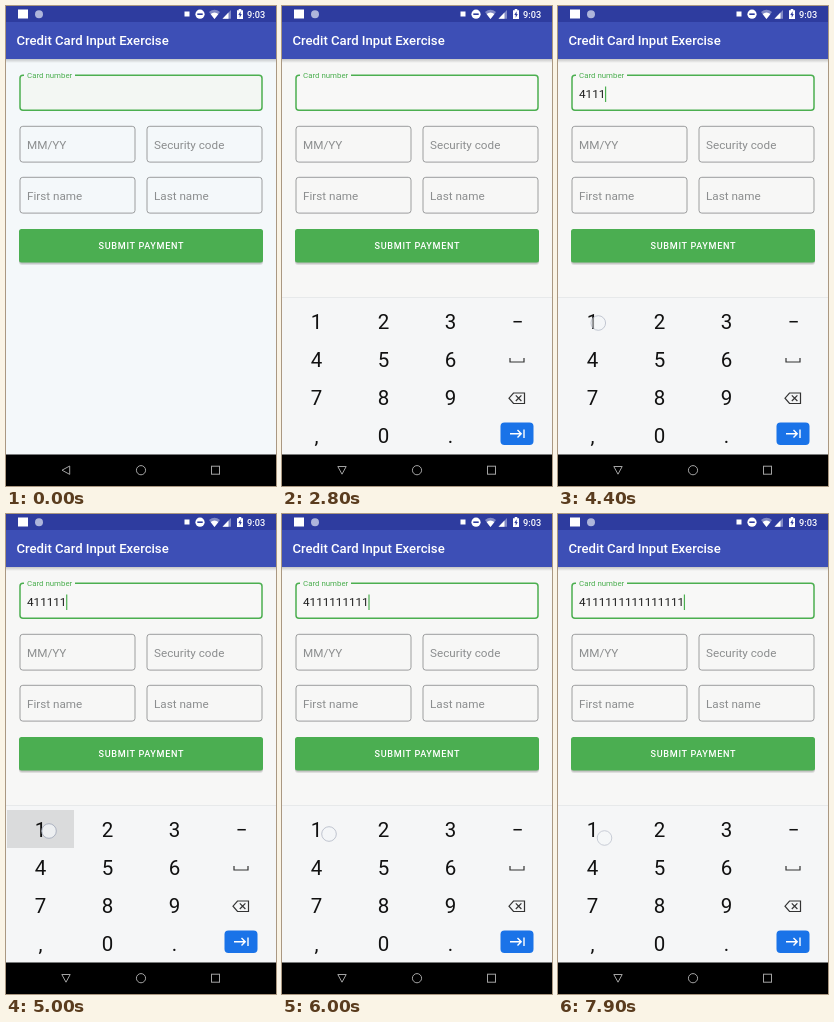
An HTML page that plays this animation: 270 px wide and 480 px high, repeating every 8000 ms.

```html
<!DOCTYPE html>
<html lang="en">
<head>
<meta charset="utf-8">
<title>Card input</title>
<style>
  html, body { margin: 0; width: 100%; height: 100%; overflow: hidden; }
  svg { display: block; width: 100%; height: 100%; }
  text { font: 11.7px Roboto, Arial, sans-serif; }
  .bold { font-weight: 500; fill: #fff; }
  .hint { fill: #8c8e8f; }
  .box { fill: none; stroke: #929495; stroke-width: .9; }
  .key { font-size: 20.5px; text-anchor: middle; fill: #111; }
  .nav { fill: none; stroke: #a3a3a3; stroke-width: 1; }
  .icon { fill: none; stroke: #333; stroke-width: 1.2; }
</style>
</head>
<body>
<svg viewBox="0 0 270 480">
  <defs>
    <linearGradient id="shade" x2="0" y2="1">
      <stop stop-color="#000" stop-opacity=".2"/>
      <stop offset="1" stop-color="#000" stop-opacity="0"/>
    </linearGradient>
  </defs>
  <rect id="page" width="270" height="480"/>

  <!-- app bar and status bar -->
  <rect y="53" width="270" height="4" fill="url(#shade)"/>
  <rect width="270" height="53" fill="#3d4fb6"/>
  <rect width="270" height="16" fill="#2e3c9f"/>
  <text class="bold" x="10.5" y="39.3" style="font-size:13.14px">Credit Card Input Exercise</text>
  <g fill="#fff">
    <rect x="12" y="3.5" width="10" height="9"/>
    <circle cx="33" cy="8.2" r="4" fill="#aeb5db"/>
    <rect x="178.5" y="5.5" width="5" height="5"/>
    <circle cx="194" cy="8.2" r="4.6"/>
    <rect x="191.3" y="7.4" width="5.4" height="1.6" fill="#2e3c9f"/>
    <path d="M203 6Q208.5 1.7 214 6L208.5 13Z" fill-opacity=".4"/>
    <path d="M204.6 8Q208.5 5 212.4 8L208.5 13Z"/>
    <path d="M216.5 12.7L225 4V12.7Z" fill-opacity=".4"/>
    <path d="M216.5 12.7L222.5 6.5V12.7Z"/>
    <path d="M231 4.2H232.7V3H235.3V4.2H237V13H231Z"/>
    <path d="M234.6 5.3L232.3 9H233.7V11.8L235.8 8H234.6Z" fill="#2e3c9f"/>
  </g>
  <text class="bold" x="241" y="11.6" style="font-size:9.2px">9:03</text>

  <!-- form -->
  <rect id="field" x="14" y="69.2" width="242" height="35" rx="3" stroke="#4caf50" stroke-width="1.5"/>
  <rect id="gap" x="18" y="66" width="51" height="5"/>
  <text x="21" y="72.3" fill="#4caf50" style="font-size:7.88px">Card number</text>
  <text id="number" x="21" y="92.3" fill="#1b1b1b"></text>
  <rect id="caret" y="80.5" width="1.2" height="15.5" fill="#4caf50"/>
  <g id="boxes"></g>
  <rect x="13" y="226" width="244" height="33" rx="3" fill="#000" opacity=".1"/>
  <rect x="13" y="224.5" width="244" height="33.3" rx="3" fill="#000" opacity=".14"/>
  <rect x="13" y="223" width="244" height="33.5" rx="2.5" fill="#4bae51"/>
  <text class="bold" x="135.4" y="243.4" text-anchor="middle" style="font-size:9.1px;letter-spacing:.7px">SUBMIT PAYMENT</text>

  <!-- keyboard -->
  <g id="keyboard">
    <rect y="291" width="270" height="160" fill="#f5f6f7"/>
    <rect y="291" width="270" height="1" fill="#e7e9ea"/>
    <rect id="press" x="1" width="67" height="38" fill="#dadbdc"/>
    <g id="keys"></g>
    <path class="icon" d="M228 352V356H242V352M231.5 387H242.5V397.5H231.5L227 392.2ZM233.8 389.4L239.4 395M239.4 389.4L233.8 395"/>
    <rect x="218.5" y="416.5" width="33" height="22.5" rx="4" fill="#1a73e8"/>
    <path d="M228 427.7H239M235.5 424L239.2 427.7L235.5 431.4M242 423.5V432" fill="none" stroke="#fff" stroke-width="1.4"/>
  </g>
  <circle id="touch" r="7.3" fill="#f4f6fa" fill-opacity=".72" stroke="#a6adbd" stroke-width=".9"/>

  <!-- navigation bar -->
  <rect y="448.5" width="270" height="32"/>
  <path id="back" class="nav" d="M56 464.2L63.7 460V468.4Z"/>
  <circle class="nav" cx="135" cy="464.2" r="4.6"/>
  <rect class="nav" x="205.5" y="460.2" width="8" height="8"/>
</svg>
<script>
const $ = id => document.getElementById(id);
const set = (id, attrs) => {
  for (const name in attrs) $(id).setAttribute(name, attrs[name]);
};
const LOOP = 8000, HOLD = 170, BLINK = 500, DIGIT = 6.57;
// Release time of every key press; the first is on 4, the others on 1.
const releases = [3200, 3800, 4060, 4340, 4630, 4900, 5150, 5420, 5690, 5950,
                  6250, 6570, 6900, 7200, 7500, 7820];
const path = [[0, 34, 355], [3300, 34, 355], [3600, 37, 317], [3900, 38, 317],
              [5000, 43, 317], [6000, 47, 320], [7000, 48, 322], [7900, 46.5, 324]];
const caretStarts = [300, 1300, 2300, ...releases];

const hints = [["MM/YY", 14, 120], ["Security code", 141, 120],
               ["First name", 14, 171], ["Last name", 141, 171]];
$("boxes").innerHTML = hints.map(([label, x, y]) =>
  `<rect class="box" x="${x}" y="${y + .3}" width="115" height="35.8" rx="2.8"/>
   <text class="hint" x="${x + 7}" y="${y + 23}">${label}</text>`).join("");

$("keys").innerHTML = ["123−", "456", "789", ",0."].map((row, r) =>
  [...row].map((char, c) =>
    `<text class="key" x="${34.5 + 67 * c}" y="${323.3 + 38 * r}">${char}</text>`
  ).join("")).join("");

function pointAt(t) {
  const next = path.findIndex(p => p[0] > t);
  if (next < 0) return path[path.length - 1].slice(1);
  const a = path[next - 1], b = path[next], k = (t - a[0]) / (b[0] - a[0]);
  return [a[1] + (b[1] - a[1]) * k, a[2] + (b[2] - a[2]) * k];
}

function draw(t) {
  const opened = t >= 1850;
  const slide = Math.min(1, Math.max(0, (t - 1850) / 500));
  set("keyboard", { transform: `translate(0 ${158 * (1 - slide) ** 3})` });
  set("back", { transform: `rotate(${-90 * slide} 60 464.2)` });

  const page = opened ? "#f7f7f6" : "#f4f8fa";
  set("page", { fill: page });
  set("gap", { fill: page });
  set("field", { fill: opened ? "#f8f8f7" : "#f3f7f3" });

  const typed = releases.filter(r => r <= t).length;
  $("number").textContent = "4".padEnd(16, "1").slice(0, typed);
  set("caret", {
    x: 21 + DIGIT * typed - (typed ? .3 : 0),
    opacity: caretStarts.some(s => t >= s && t < s + BLINK) ? 1 : 0
  });

  // The first two presses are held longer.
  const hold = typed < 2 ? 220 : HOLD;
  const pressed = typed < releases.length && t >= releases[typed] - hold;
  const age = typed ? t - releases[typed - 1] : Infinity;
  const [cx, cy] = pointAt(t);
  set("press", { y: typed ? 296 : 334, opacity: pressed ? 1 : 0 });
  set("touch", { cx, cy, opacity: pressed ? 1 : Math.max(0, 1 - age / 220) });
}

function tick() {
  draw(performance.now() % LOOP);
  requestAnimationFrame(tick);
}
tick();
</script>
</body>
</html>
```
